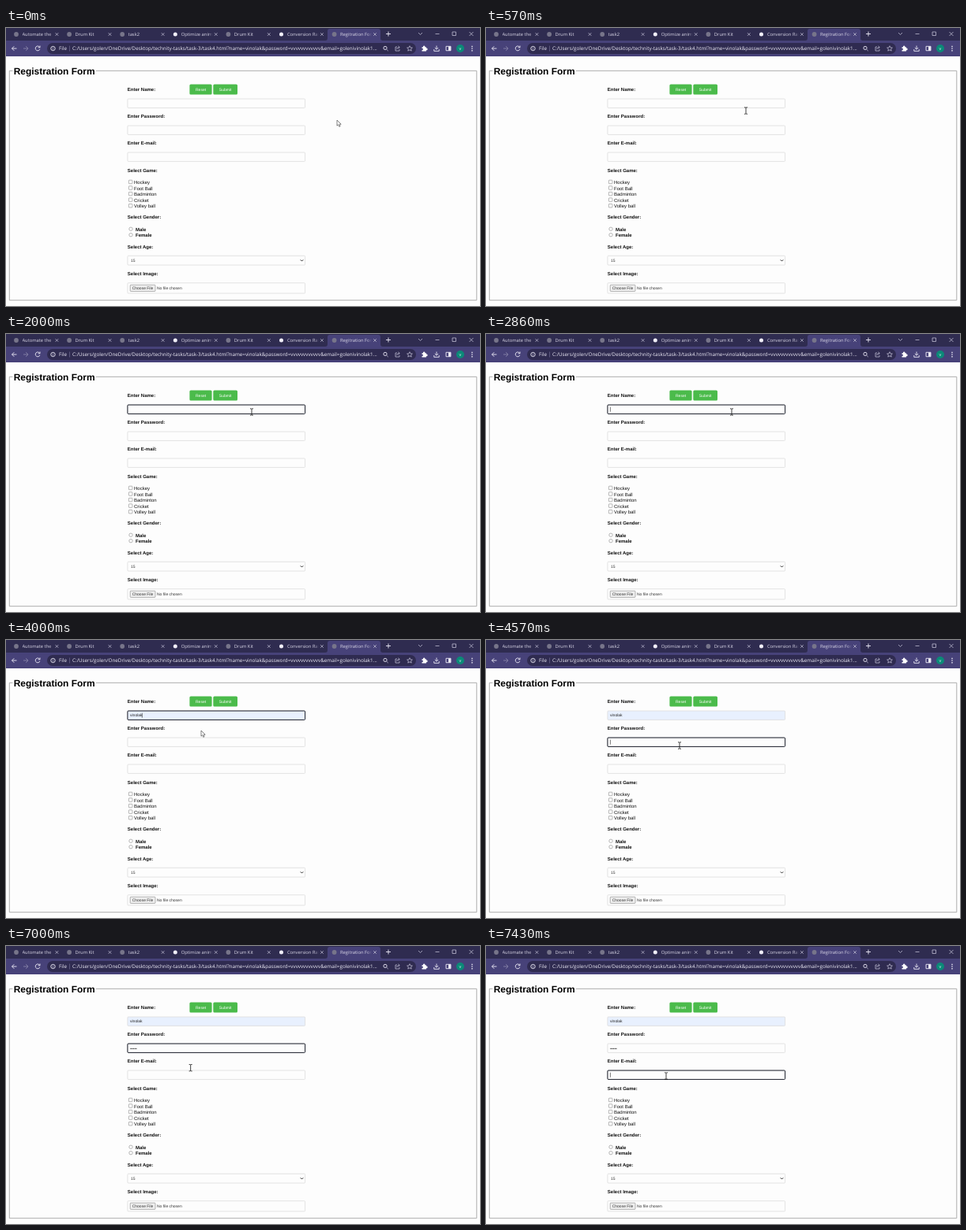
An HTML page for the animation above (8 s loop, 600 by 353 pixels).

```html
<!DOCTYPE html>
<html lang="en">
<head>
<meta charset="utf-8">
<title>Registration Form</title>
<style>
html, body { margin: 0; width: 100%; height: 100%; overflow: hidden; background: #fdfdfd; }
svg { display: block; }
text { font: 6px "Liberation Sans", Arial, sans-serif; white-space: pre; text-rendering: geometricPrecision; }
.ui text { font: 6.3px "Open Sans", "Noto Sans", sans-serif; fill: #efedf8; }
.ui .tab { font-size: 5.8px; fill: #d9d6e6; }
.ui path, .ui circle.line { fill: none; stroke: #eceaf6; stroke-width: .9; }
.ui .dim { stroke: #bcb9d0; stroke-width: .8; }
.b { font-weight: bold; }
.s { font-size: 5px; }
.box { fill: #fdfdfd; stroke: #dcdcdc; stroke-width: .8; }
.tick { fill: #fff; stroke: #858585; stroke-width: .6; }
</style>
</head>
<body>
<svg id="stage" width="600" height="353" viewBox="0 0 600 353">
  <defs>
    <linearGradient id="fade"><stop offset=".86" stop-color="#fff"/><stop offset="1"/></linearGradient>
    <mask id="clip" maskUnits="userSpaceOnUse" x="0" y="0" width="40" height="16">
      <rect width="40" height="16" fill="url(#fade)"/>
    </mask>
  </defs>
  <rect width="600" height="353" fill="#fdfdfd"/>
  <g class="ui">
    <rect width="600" height="17" fill="#2f2c50"/>
    <rect y="16" width="600" height="20" fill="#474279"/>
    <path d="M404 16q3 0 3-3V4q0-3 3-3h61q3 0 3 3v9q0 3 3 3z" style="fill:#474279;stroke:none"/>
    <g id="tabs"></g>
    <path d="M481 7.500h6M484 4.500v6"/>
    <path class="dim" d="M522 6l2.500 2.500 2.500-2.500M543.500 7.500h5M565 5h4.500v4.500h-4.500zM586.500 5l5 5m0-5l-5 5"/>
    <path d="M13.500 26h-6m2.800-2.800l-2.800 2.800 2.800 2.800M42.600 24.300a2.900 2.900 0 1 0 .3 2.500M43 22.500v2.300h-2.300"/>
    <path d="M22 26h6m-2.800-2.800l2.800 2.800-2.800 2.800" style="stroke:#8783a8"/>
    <rect x="52" y="19" width="467" height="14" rx="7" fill="#2f2b50"/>
    <circle class="line dim" cx="59.500" cy="26" r="2.700"/>
    <path class="dim" d="M59.500 25.600v2M59.500 24.300v.7"/>
    <text x="67" y="28.300">File</text>
    <path d="M80.500 22.500v7" style="stroke:#77739a;stroke-width:.6"/>
    <text x="84" y="28.300">C:/Users/golen/OneDrive/Desktop/technity-tasks/task-3/task4.html?name=vinolak&amp;password=vvvvvvvvvvvv&amp;email=golenivinolak1...</text>
    <circle class="line dim" cx="480" cy="25.400" r="2.100"/>
    <path class="dim" d="M481.600 27l2.200 2.200M495 24h-2v5h5v-2M494.500 27q.3-2.500 3.500-2.500m-1.500-1.700l1.800 1.700-1.800 1.700"/>
    <path class="dim" d="M511 22.700l1 2.200 2.400.2-1.800 1.600.6 2.400-2.200-1.300-2.200 1.300.6-2.400-1.800-1.600 2.400-.2z"/>
    <path d="M526.500 24.300h1.600a1.200 1.200 0 1 1 2.200 0h1.600v1.500a1.200 1.200 0 1 1 0 2.200v1.500h-5.400v-1.800a1 1 0 1 0 0-1.700z" style="fill:#fff;stroke:none"/>
    <path d="M545 22.500v4.500m-2.200-2l2.200 2.200 2.200-2.200M541.800 27v2.300h6.400v-2.300M557 23.300h6v5.400h-6z"/>
    <rect x="560" y="23.300" width="3" height="5.400" fill="#eceaf6"/>
    <circle cx="575" cy="26" r="5" fill="#0b8a78"/>
    <text x="575" y="28" text-anchor="middle" style="font-size:5.500px">v</text>
    <path d="M590 22.800v7" style="stroke-width:1.400;stroke-dasharray:1.400 1.200"/>
  </g>
  <path d="M8.500 54.300H4.300V345.700H595.800V54.300H114" fill="none" stroke="#adadad"/>
  <text class="b" x="9.700" y="58.700" style="font-size:11.950px">Registration Form</text>
  <g id="form"></g>
  <rect id="ring" x="153.900" y="90" width="224.700" height="11.400" rx="1" fill="none" stroke="#1c202c"/>
  <text id="name" class="s" x="157" y="97.400" fill="#222">vinolak</text>
  <text id="dots" class="s" x="157" y="131.500" fill="#222"></text>
  <path id="caret" d="M0-3v6" stroke="#222" stroke-width=".6"/>
  <path id="arrow" d="M0 0v7.200l1.700-1.500 1.100 2.600 1.300-.6-1.100-2.500h2.200z" fill="#fff" stroke="#333" stroke-width=".6"/>
  <path id="beam" d="M-2-4.200h1.500l.5.500.5-.5h1.500M0-3.800v7.600M-2 4.200h1.500l.5-.5.5.5h1.500" fill="none" stroke="#111" stroke-width=".8"/>
</svg>
<script>
const $ = id => document.getElementById(id);
const ROWS = [95.7, 129.7, 163.7];

const text = (x, y, s, cls = '', fill = '#111') =>
  `<text x="${x}" y="${y}" class="${cls}" fill="${fill}">${s}</text>`;
const small = (x, y, s, fill = '#333') => text(x, y, s, 's', fill);
const rect = (x, y, w, h, cls, extra = '') =>
  `<rect x="${x}" y="${y}" width="${w}" height="${h}" class="${cls}" ${extra}/>`;
const field = (y, h, id = '') => rect(153.9, y, 224.7, h, 'box', `rx="1" id="${id}"`);

const titles = ['Automate the', 'Drum Kit', 'task2', 'Optimize anim', 'Drum Kit', 'Conversion Rat', 'Regitration Form'];
$('tabs').innerHTML = titles.map((title, i) => {
  const x = 13 + i * 67.1;
  const bright = i === 3 || i === 5;
  return `<circle cx="${x}" cy="8" r="${bright ? 2.5 : 2.9}" fill="${bright ? '#f1effa' : '#77758a'}"/>
    <svg x="${x + 7.4}" width="40" height="16"><g mask="url(#clip)"><text class="tab" y="10.1">${title}</text></g></svg>
    <path class="dim" d="M${x + 49.6} 6.2l3.600 3.600m0-3.600l-3.600 3.600"/>`;
}).join('');

const labels = [['Enter Name:', 80.2], ['Enter Password:', 114.3], ['Enter E-mail:', 148.3], ['Select Game:', 182.5],
  ['Select Gender:', 242.3], ['Select Age:', 279.6], ['Select Image:', 313.9]];
const games = ['Hockey', 'Foot Ball', 'Badminton', 'Cricket', 'Volley ball'];
const button = (x, w, s, tx) =>
  rect(x, 71.4, w, 13, '', 'rx="1.5" fill="#4bbb4b"') + small(tx, 79.6, s, '#fff');

$('form').innerHTML = [
  ...labels.map(([s, y]) => text(153.8, y, s, 'b')),
  button(232.4, 28.2, 'Reset', 240),
  button(262.3, 30.7, 'Submit', 269.8),
  ...ROWS.map((y, i) => field(y - 5.7, 11.4, 'field' + i)),
  ...games.map((s, i) => rect(155.4, 193.2 + i * 7.55, 4.5, 4.5, 'tick', 'rx=".6"') + text(162, 198 + i * 7.55, s)),
  ...['Male', 'Female'].map((s, i) =>
    `<circle class="tick" cx="158" cy="${255.2 + i * 7.5}" r="2.2"/>` + text(164, 257.5 + i * 7.5, s, 'b')),
  field(289.2, 11.8),
  small(158, 297, '15'),
  '<path d="M372.800 294.300l1.700 1.700 1.700-1.700" fill="none" stroke="#111" stroke-width=".9"/>',
  field(323.7, 13.2),
  rect(157.2, 326.2, 31.8, 8.2, '', 'rx=".8" fill="#efefef" stroke="#858585" stroke-width=".6"'),
  small(159.7, 332.2, 'Choose File'),
  small(191, 332.2, 'No file chosen')
].join('');

// Pointer path: [step, x, y], seven steps per second
const path = [[0, 419, 117], [4, 329, 105], [7, 311, 99], [27, 311, 99], [28, 247, 115],
  [31, 245, 134], [47, 245, 134], [50, 228, 165], [56, 228, 165]];
const within = (n, a, b) => n >= a && n < b;
const show = (id, on) => $(id).setAttribute('visibility', on ? 'visible' : 'hidden');
const move = (id, x, y) => $(id).setAttribute('transform', `translate(${x} ${y})`);

function pointer(n) {
  const i = path.findIndex(p => p[0] > n);
  const [a, x0, y0] = path[i - 1], [b, x1, y1] = path[i];
  const k = (n - a) / (b - a);
  return [x0 + (x1 - x0) * k, y0 + (y1 - y0) * k];
}

function draw(ms) {
  const n = Math.floor((ms % 8000 + 5) * 7 / 1000) % 56;
  const focus = n < 10 ? -1 : n < 31 ? 0 : n < 52 ? 1 : 2;
  const filled = n >= 28;
  const count = Math.max(0, Math.min(5, n - 39));

  show('name', filled);
  $('field0').style.fill = filled ? '#e8f0fe' : '#fdfdfd';
  $('dots').textContent = '•'.repeat(count);

  show('ring', focus >= 0);
  if (focus >= 0) move('ring', 0, ROWS[focus] - ROWS[0]);
  const resting = within(n, 14, 17) || within(n, 21, 24) || within(n, 48, 52);
  show('caret', focus >= 0 && !resting);
  const typed = focus === 0 && filled ? 14.9 : focus === 1 ? count * 1.75 : 0;
  move('caret', 157.4 + typed, ROWS[Math.max(focus, 0)]);

  const [x, y] = pointer(n);
  const isArrow = x > 379 || within(n, 28, 30);
  show('arrow', isArrow);
  show('beam', !isArrow);
  move(isArrow ? 'arrow' : 'beam', x, y);
}

function tick() {
  draw(performance.now());
  requestAnimationFrame(tick);
}
tick();
</script>
</body>
</html>
```
